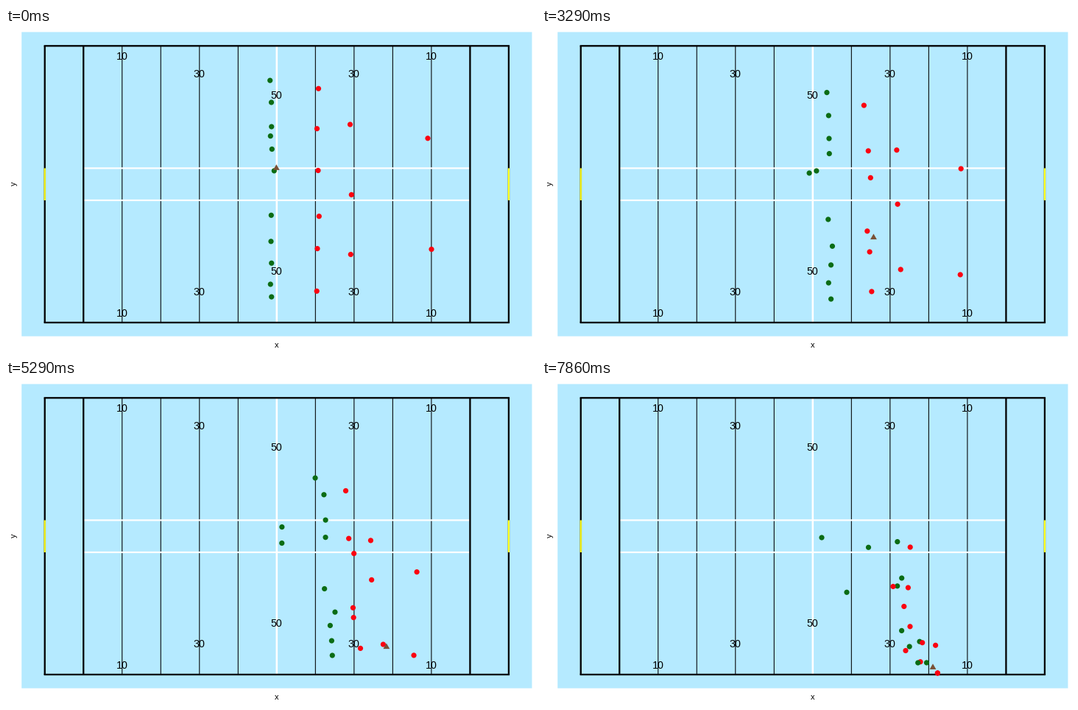
A matplotlib script for the animation above (8000 ms loop, 720 by 440 pixels).

```python
import numpy as np
import matplotlib.pyplot as plt
from matplotlib.animation import FuncAnimation
from matplotlib.patches import Polygon, Rectangle

W, H, DPI = 720, 440, 80
PX = 72 / DPI                      # one pixel in points
LOOP, TICK, POSES = 8000, 40, 56
LEAD = 33                          # ms, lets a pose start on the nearest tick

SKY, GREEN, RED, BROWN = "#b5eaff", "#0b6c14", "#fb0210", "#7a5136"

# each player: start, place at the turn, end
RETURNERS = [
    [(468.3, 307.5), (504, 348), (537.4, 398)],
    [(422.2, 357.3), (470.3, 361.3), (514, 382.7)],
]
CHASERS = [
    [(358.7, 71.2), (409.7, 114), (443.5, 227.3)],
    [(360.5, 101), (417, 141.3), (482.8, 219.6)],
    [(360.7, 134), (418.5, 173.7), (488.7, 269)],
    [(359.3, 146.7), (419, 197.4), (482.7, 279.8)],
    [(364.3, 193.9), (368.7, 210), (414, 288.3)],
    [(360.3, 254.3), (417, 273), (488.6, 340.4)],
    [(360, 289.8), (428.3, 307.2), (513, 355.2)],
    [(360.7, 319.3), (423.5, 328.2), (499.2, 362)],
    [(359.3, 348), (422.5, 349.7), (522.5, 383.9)],
    [(360.7, 365.1), (425, 371.7), (510.7, 384)],
]
BLOCKERS = [
    [(424.5, 82.3), (452.3, 132.8), (500.2, 227)],
    [(422.5, 136.7), (459, 197.7), (477, 280.4)],
    [(467.5, 131), (491.8, 199.5), (497.4, 282)],
    [(573, 149.8), (562.8, 235), (534.6, 360.3)],
    [(424, 193.5), (464.4, 221.7), (491.8, 307.5)],
    [(469.3, 226.4), (492.9, 258.2), (500, 334.8)],
    [(425.3, 255.7), (460.3, 297), (516.7, 356.7)],
    [(423, 299.6), (463.5, 314.3), (494, 367.5)],
    [(578, 300.5), (559, 362), (537.4, 398)],
]
TURN = 32


def run(k):
    """Share of the run done at pose k: at rest, then steady speed."""
    def ramp(t):
        return 2 * np.log1p(np.exp((t - 14) / 2))
    return (ramp(k) - ramp(0)) / (ramp(POSES - 1) - ramp(0))


def squad(paths, k):
    """Players on parabolas through their three points."""
    start, turn, end = np.array(paths).transpose(1, 0, 2)
    u, m = run(k), run(TURN)
    bend = (end - start - (turn - start) / m) / (1 - m)
    return start + u * (end - start) + u * (u - 1) * bend


def kicker(k):
    approach = min(k / 18, 1)
    return (np.array([361.3, 164.5]) + approach * np.array([11.2, 28.5])
            + run(k) ** 2 * np.array([7.5, 21]))


def ball(k):
    """Lies on the tee, flies with drag, then is carried."""
    tee, catch, down = np.array([(367.3, 190.3), (538, 388.6), (531, 390.4)])
    drag = np.array([0.39, 0.34])
    s = np.clip((k - 10) / 33, 0, 1)
    carry = max(k - 43, 0) / (POSES - 1 - 43)
    return tee + (catch - tee) * s * (1 + drag * (1 - s)) + (down - catch) * carry


def players(k):
    return np.vstack([squad(RETURNERS, k), kicker(k), squad(CHASERS, k),
                      squad(BLOCKERS, k)])


COLORS = ([RED] * len(RETURNERS) + [GREEN] * (1 + len(CHASERS))
          + [RED] * len(BLOCKERS))
TRI = 5.1 * np.array([[0, -1], [0.866, 0.5], [-0.866, 0.5]])

fig = plt.figure(figsize=(W / DPI, H / DPI), dpi=DPI, facecolor="white")
ax = fig.add_axes([0, 0, 1, 1])
ax.set_xlim(0, W)
ax.set_ylim(H, 0)
ax.axis("off")


def line(x0, y0, x1, y1, color="black", width=2.3, cap="butt"):
    ax.plot([x0, x1], [y0, y1], color=color, lw=width * PX, zorder=2,
            solid_capstyle=cap, snap=False)


def label(x, y, text, size, **kw):
    ax.text(x, y, text, fontsize=size * PX, family="Liberation Sans",
            ha="center", va="center_baseline", color="black", zorder=3, **kw)


def yard(n):
    return 52.7 + 5.252 * n


TOP, BOTTOM = 24.3, 400
HASH = (190.4, 234)

ax.add_patch(Rectangle((21.2, 5.5), 693.3, 413.1, color=SKY, lw=0, zorder=1,
                       snap=False))
for n in range(20, 101, 10):
    if n != 60:
        line(yard(n), TOP, yard(n), BOTTOM, width=1.07)
line(yard(60), TOP, yard(60), BOTTOM, "white", 2.6)
for y in HASH:
    line(yard(10), y, yard(110), y, "white", 2.2)
for n in (0, 10, 110, 120):
    line(yard(n), TOP, yard(n), BOTTOM)
for y in (TOP, BOTTOM):
    line(yard(0), y, yard(120), y, cap="projecting")
for n in (0, 120):
    line(yard(n), HASH[0], yard(n), HASH[1], "#ffff20")

for num, high, low in ((10, 37.4, 386.4), (30, 61.4, 357.4), (50, 90.4, 329.4)):
    for n in {10 + num, 110 - num}:
        for y in (high, low):
            label(yard(n) - 0.2, y, str(num), 14.3)
label(367.6, 429.6, "x", 11)
label(10.5, 212, "y", 11, rotation=90)

dots = ax.scatter(*players(0).T, s=(7.2 * PX) ** 2, c=COLORS, linewidths=0,
                  zorder=4)
marker = Polygon(ball(0) + TRI, facecolor=BROWN, lw=0, zorder=5)
ax.add_patch(marker)


def draw(i):
    k = int((i * TICK + LEAD) * POSES / LOOP)
    dots.set_offsets(players(k))
    marker.set_xy(ball(k) + TRI)
    return dots, marker


anim = FuncAnimation(fig, draw, frames=LOOP // TICK, interval=TICK,
                     repeat=True, repeat_delay=0)
plt.show()
```
